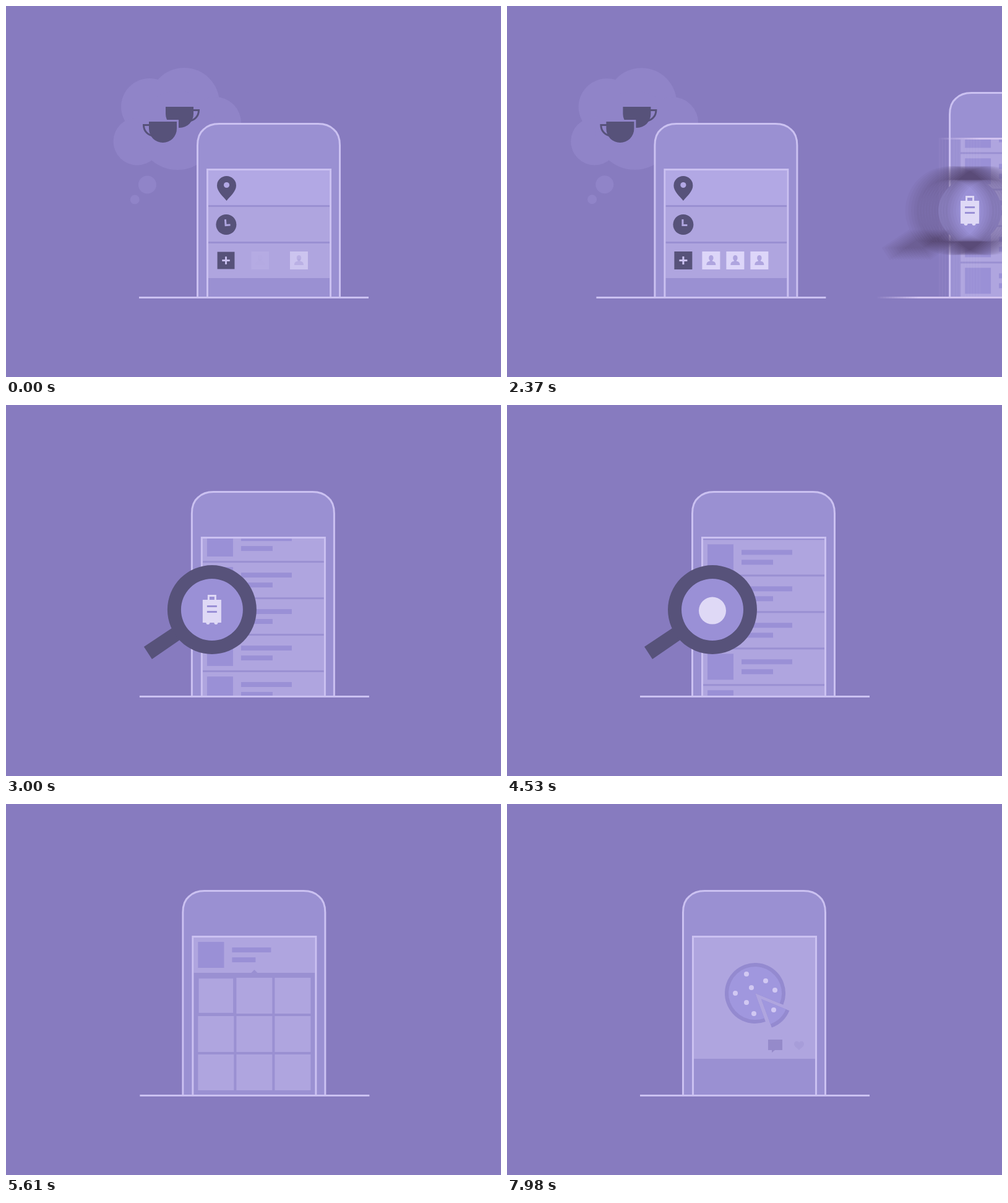
These frames come from a looping animation (800x600 px, 8000 ms). An HTML page with a canvas:

```html
<!DOCTYPE html>
<html lang="en">
<head>
<meta charset="utf-8">
<title>Phone stories</title>
<style>
html, body { margin: 0; width: 100%; height: 100%; overflow: hidden; background: #877bbf; }
canvas { display: block; width: 800px; height: 600px; }
</style>
</head>
<body>
<canvas id="stage" width="800" height="600"></canvas>
<script>
const LOOP = 8000, TAU = Math.PI * 2;
const BG = '#877bbf', CLOUD = '#9084c8', BODY = '#9a90d2', ROW = '#afa5df',
      TOP_ROW = '#b2a8e4', LINE = '#cbc1f1', DARK = '#57527a', NOTE = '#726aa0',
      SOFT = '#9a90d6', PALE = '#dfd9f6';

const main = document.getElementById('stage').getContext('2d');
const layer = document.createElement('canvas');
layer.width = 800;
layer.height = 600;
const layerCtx = layer.getContext('2d');
let g = main;

const clamp = v => Math.max(0, Math.min(1, v));
const ramp = (t, a, b) => clamp((t - a) / (b - a));
const mix = (a, b, k) => a + (b - a) * k;
const cubicOut = p => 1 - (1 - p) ** 3;
const expoOut = p => (1 - 2 ** (-10 * clamp(p))) / (1 - 2 ** -10);

function rect(x, y, w, h, color) {
  g.fillStyle = color;
  g.fillRect(x, y, w, h);
}
function disc(x, y, r, color, ry = r) {
  g.fillStyle = color;
  g.beginPath();
  g.ellipse(x, y, r, ry, 0, 0, TAU);
  g.fill();
}
function shape(d, color) {
  g.fillStyle = color;
  g.fill(new Path2D(d));
}
function stroke(d, color, width = 3) {
  g.strokeStyle = color;
  g.lineWidth = width;
  g.stroke(new Path2D(d));
}
function group(draw, { x = 0, y = 0, alpha = 1, scale = 1, turn = 0, cx = 0, cy = 0 } = {}) {
  if (alpha <= 0) return;
  g.save();
  g.globalAlpha *= alpha;
  g.translate(cx + x, cy + y);
  g.rotate(turn);
  g.scale(scale, scale);
  g.translate(-cx, -cy);
  draw();
  g.restore();
}
function clipped(d, draw) {
  g.save();
  g.clip(new Path2D(d));
  draw();
  g.restore();
}

// Averages shifted copies to get horizontal motion blur.
function smear(x, width, draw) {
  if (width < 0.8) return group(draw, { x });
  const n = 15;
  g = layerCtx;
  g.clearRect(0, 0, 800, 600);
  g.globalCompositeOperation = 'lighter';
  for (let i = 0; i < n; i++) {
    group(draw, { x: x + width * (i / (n - 1) - 0.5), alpha: 1 / n });
  }
  g = main;
  g.drawImage(layer, 0, 0);
}

function phoneBody(x, y) {
  const d = `M${x} 471V${y + 35}Q${x} ${y + 17} ${x + 10} ${y + 9}Q${x + 19} ${y} ${x + 35} ${y}` +
            `H${x + 195}Q${x + 211} ${y} ${x + 220} ${y + 9}Q${x + 230} ${y + 17} ${x + 230} ${y + 35}V471`;
  shape(d, BODY);
  stroke(d, LINE);
}
function screenFrame(x, y) {
  stroke(`M${x + 16} 471V${y + 74}h199V471`, LINE);
}
function ground() {
  rect(215, 470, 371, 3, LINE);
}

// Planning scene

function cloud(t) {
  const beat = (1 + Math.cos(t * TAU / 2760)) / 2;
  group(() => {
    disc(232, 163, 46, CLOUD);
    disc(288, 157, 57, CLOUD);
    disc(338, 189, 42, CLOUD);
    disc(212, 219, 38.5, CLOUD);
    disc(277, 201, 64, CLOUD);
  }, { scale: mix(0.986, 1, beat), cx: 277, cy: 200 });
  disc(228.4, mix(288, 289, beat), 14.5, CLOUD);
  disc(208.2, mix(311.5, 313, beat), 7.5, CLOUD);
}

const BOWL = 'M231 187H276V198.5A22.5 22.5 0 0 1 231 198.5Z';
function cup() {
  shape(BOWL, DARK);
  stroke('M233 192.5H222.5C222.5 203 230 209 238 210', DARK);
}
function cups() {
  g.save();
  g.translate(534, -24);
  g.scale(-1, 1);
  cup();
  g.restore();
  stroke(BOWL, CLOUD, 6);
  cup();
}
function music() {
  clipped('M260 130H310V166H260Z', () => disc(281.5, 156.5, 13.6, DARK));
  shape('M273 169H290.5L288 206H275Z', DARK);
  stroke('M281.5 206Q283 213 291 212.5', NOTE);
  disc(236.5, 173.5, 5.5, NOTE, 4.5);
  rect(239, 150, 3, 24, NOTE);
  shape('M241 150C243 156 248 157 248 163Q248 166 245 169C246 163 244 160 241 159Z', NOTE);
  disc(234.5, 222.5, 5.5, NOTE, 4.5);
  disc(251.5, 220.5, 5.5, NOTE, 4.5);
  shape('M237 197L257 195V220H254V201L240 202.5V222H237Z', NOTE);
}

function avatar(x, alpha) {
  group(() => {
    rect(0, 397, 29, 29, '#ddd6f9');
    disc(14.5, 407.6, 3.7, ROW, 4.6);
    shape('M7 419C7 414.5 9 413.5 12.5 412.5V409H16.5V412.5C20 413.5 22 414.5 22 419Z', ROW);
  }, { x, alpha });
}

function planScene(t) {
  cloud(t);
  const swap = t < 1500 ? ramp(t, 360, 660) : 1 - ramp(t, 1860, 2160);
  group(cups, { alpha: clamp(1 - 2 * swap) });
  group(music, {
    alpha: clamp(2 * swap - 1), cx: 262, cy: 185,
    scale: mix(1.2, 1, cubicOut(ramp(t, 1110, 1380)))
  });

  phoneBody(309.5, 190.5);
  rect(327, 266, 196, 56, TOP_ROW);
  rect(327, 325, 196, 56, ROW);
  rect(327, 384, 196, 56, ROW);

  const rest = 1 - cubicOut(ramp(t, 0, 500));
  group(() => {
    shape('M355.5 315C350 308 340 300 340 290.5A15.5 15.5 0 0 1 371 290.5C371 300 361 308 355.5 315Z', DARK);
    disc(355.5, 289.5, 4.6, TOP_ROW);
  }, { x: rest });
  disc(355.5 + rest * 0.4, 353.5, 16.5, DARK);
  group(() => stroke('M354.5 345V354.5H362', ROW),
    { x: rest * 0.5, turn: -0.07 * rest, cx: 355.5, cy: 353.5 });

  for (let i = 0; i < 3; i++) {
    const p = ramp(t, 183 - i * 239, 783 - i * 239);
    avatar(386 + 39 * (i - 1 + cubicOut(p)), clamp(p * 1.3));
  }
  group(() => {
    rect(341, 397, 29, 29, DARK);
    rect(349, 410, 13, 3, LINE);
    rect(354, 405, 3, 13, LINE);
  }, { scale: 1 - 0.04 * rest, cx: 355.5, cy: 411.5 });

  screenFrame(309.5, 190.5);
  ground();
}

// Search scene

const SCROLLS = [2360, 3180, 3990];

function results(t) {
  const moved = SCROLLS.reduce((sum, s) => sum + expoOut((t - s) / 760), 0);
  const first = 301 - 48 * moved;
  rect(317, 216, 196, 254, ROW);
  clipped('M317 216H513V470H317Z', () => {
    for (let y = (first % 59) + 118; y < 475; y += 59) {
      rect(317, y - 1, 196, 3, BODY);
      rect(324, y + 9, 42, 42, SOFT);
      rect(379, y + 18, 82, 8, SOFT);
      rect(379, y + 34, 51, 8, SOFT);
    }
  });
}

function suitcase() {
  stroke('M326.5 316V308.5H337.5V316', PALE);
  disc(325.5, 352, 3, PALE);
  disc(338.5, 352, 3, PALE);
  rect(317, 315, 30, 37, PALE);
  rect(324, 324, 16, 3, SOFT);
  rect(324, 333, 16, 3, SOFT);
}
function lens() {
  shape('M222 391L267 361L280 380L235 411Z', DARK);
  g.fillStyle = DARK;
  g.beginPath();
  g.arc(332, 331, 72, 0, TAU);
  g.arc(332, 331, 50, 0, TAU, true);
  g.fill();
}
function lensView(t) {
  disc(332, 331, 51, SOFT);
  clipped('M282 331A50 50 0 0 1 382 331A50 50 0 0 1 282 331Z', () => {
    const pos = expoOut((t - 3180) / 760) + expoOut((t - 3990) / 760);
    [suitcase, ball, ball].forEach((draw, i) => group(draw, { y: (i - pos) * 100 }));
  });
}
function ball() {
  disc(332, 332, 22, PALE);
}

function searchScene(t, x, blur) {
  group(() => {
    phoneBody(299.5, 140.5);
    results(t);
  }, { x });
  smear(x, blur, () => screenFrame(299.5, 140.5));
  smear(x, blur, ground);
  group(() => lensView(t), { x });
  smear(x, blur, lens);
}

// Gallery scene

function profile() {
  rect(302, 216, 196, 57, ROW);
  rect(309, 223, 42, 42, SOFT);
  rect(364, 232, 63, 8, SOFT);
  rect(364, 248, 38, 8, SOFT);
  shape('M395 273L400 268L405 273Z', BODY);
  for (let i = 1; i < 9; i++) {
    rect(309 + 62 * (i % 3), 281 + 62 * Math.floor(i / 3), 58, 58, ROW);
  }
}

function slice(from, to) {
  for (const [r, color] of [[49, '#948ad0'], [43, '#a097de']]) {
    g.fillStyle = color;
    g.beginPath();
    g.moveTo(401, 306);
    g.arc(401, 306, r, from, to);
    g.fill();
  }
}
function pizza() {
  const a = 0.39, b = 1.22;
  slice(b, a + TAU);
  group(() => slice(a, b), { x: 10, y: 9.5 });
  [[387, 275], [418, 286], [395, 297], [433, 301], [369, 306], [387, 321], [399, 339], [431, 333]]
    .forEach(([x, y]) => disc(x, y, 4, '#d1c8f2'));
}
function reactions(t, start) {
  group(() => shape('M422 381H445V398H433L428 402V398H422Z', '#857abd'),
    { alpha: ramp(t, start, start + 210) });
  group(() => shape('M472 398C468 394 464 392 464 388C464 383 470 382 472 386C474 382 480 383 480 388C480 392 476 394 472 398Z', '#857abd'),
    { alpha: ramp(t, start + 90, start + 330) });
}

function galleryScene(t, x, blur) {
  const open = cubicOut(ramp(t, 5625, 5705));
  group(() => {
    phoneBody(284.5, 140.5);
    group(profile, { alpha: 1 - open });
    const press = 1.5 * ramp(t, 5570, 5620) * (1 - open);
    const size = mix(58, 196, open) - press * 2;
    rect(mix(309, 302, open) + press, mix(281, 216, open) + press, size, size, ROW);
    clipped('M302 216H498V412H302Z', () => {
      const second = t > 7300;
      const slide = second
        ? 196 * (1 - expoOut((t - 7455) / 300))
        : 196 * (1 - expoOut((t - 5835) / 115)) - 196 * expoOut((t - 6855) / 240);
      group(pizza, { x: slide });
      group(() => reactions(t, second ? 7850 : 6080), { x: second ? 0 : Math.min(slide, 0) });
    });
  }, { x });
  smear(x, blur, () => screenFrame(284.5, 140.5));
  smear(x, blur, ground);
}

const arriveSearch = t => 460 * (1 - expoOut((t - 2360) / 760));
const arriveGallery = t => 800 * (1 - expoOut((t - 4790) / 960));
const speed = (fn, t) => fn(t - 8.5) - fn(t + 8.5);

function render(t) {
  g = main;
  rect(0, 0, 800, 600, BG);
  if (t < 3200) group(() => planScene(t), { x: -739 * expoOut((t - 2360) / 760) });
  if (t >= 2360 && t < 5800) {
    searchScene(t, arriveSearch(t) - 800 * expoOut((t - 4790) / 960), speed(arriveSearch, t));
  }
  if (t >= 4790) galleryScene(t, arriveGallery(t), speed(arriveGallery, t));
}

const begin = performance.now();
function frame() {
  render((performance.now() - begin) % LOOP);
  requestAnimationFrame(frame);
}
render(0);
requestAnimationFrame(frame);
</script>
</body>
</html>
```
